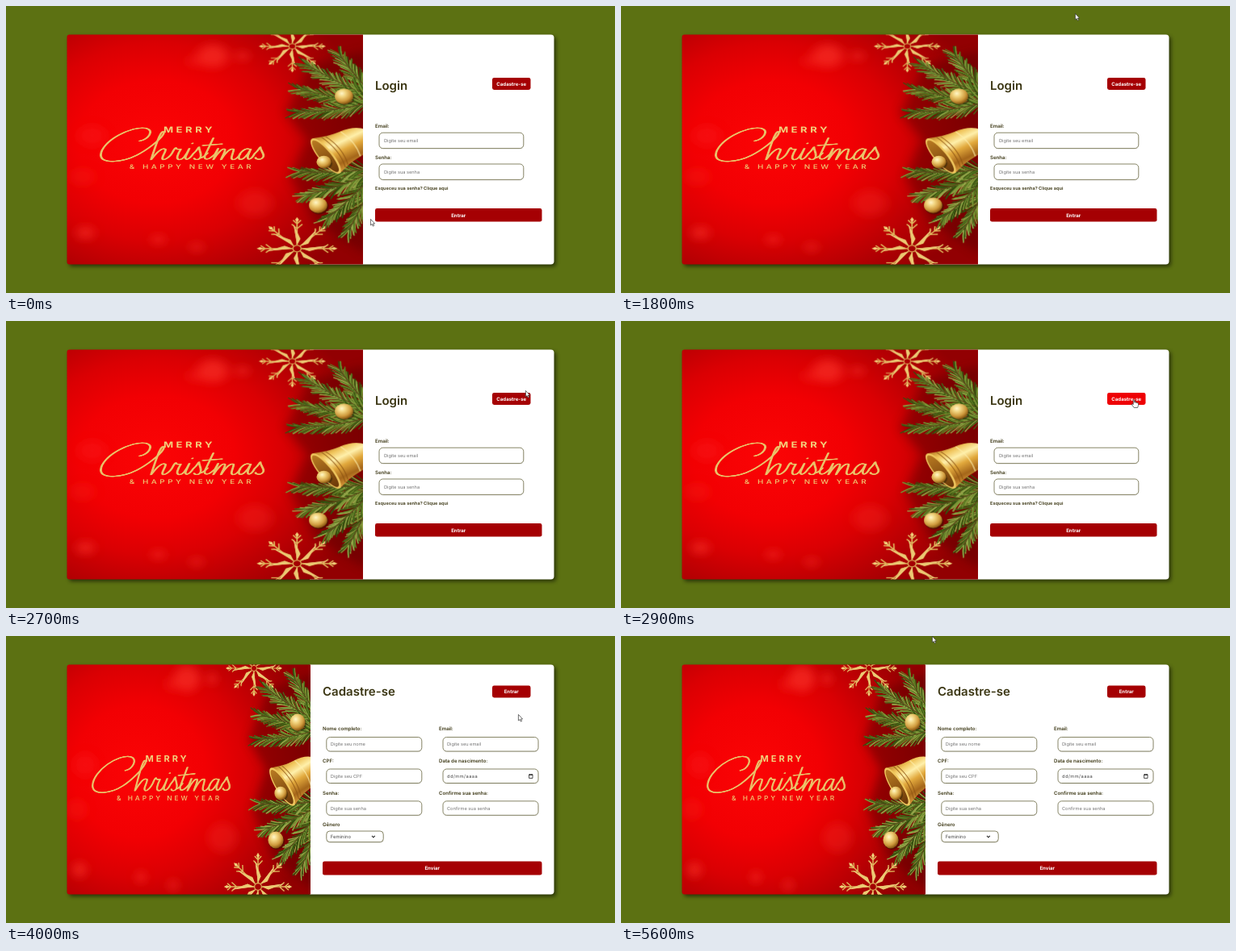
Recreate the animation shown at these times as an HTML page. Size 754 by 356 pixels, loop 5800 ms.

```html
<!DOCTYPE html>
<html lang="pt-BR">
<head>
<meta charset="utf-8">
<title>Login</title>
<style>
html, body { margin: 0; width: 100%; height: 100%; overflow: hidden; background: #5c7112; }
svg { display: block; width: 754px; height: 356px; }
text { font-family: Inter, "Open Sans", sans-serif; white-space: pre; text-rendering: geometricPrecision; }
</style>
</head>
<body>
<svg id="stage" viewBox="0 0 754 356"></svg>
<script>
const LOOP = 5800;
const INK = '#3b3613', RED = '#a50003', HOVER = '#ee0004';

// seeded random, so the art is the same on every load
let seed = 11;
const rnd = () => (seed = (seed * 16807) % 2147483647) / 2147483647;
const between = (a, b) => a + (b - a) * rnd();

const rect = (x, y, w, h, r, fill, more = '') =>
  `<rect x="${x}" y="${y}" width="${w}" height="${h}" rx="${r}" fill="${fill}" ${more}/>`;
const text = (x, y, str, size, weight, fill, more = '') =>
  `<text x="${x}" y="${y}" font-size="${size}" font-weight="${weight}" fill="${fill}" ${more}>${str}</text>`;

const title = (x, y, str) => text(x, y, str, 15, 600, INK);
const label = (x, mid, str, size = 6.1) => text(x, mid + 2.2, str, size, 600, INK);
const button = (x, y, w, h, str, id = '') =>
  rect(x, y, w, h, 2.4, RED, id && `id="${id}"`) +
  text(x + w / 2, y + h / 2 + 2.2, str, 6.1, 700, '#fff', 'text-anchor="middle"');
const box = (x, y, w, h, r) =>
  rect(x + .3, y + 1, w, h, r, '#000', 'opacity=".1"') +
  rect(x, y, w, h, r, '#fff', 'stroke="#69663f" stroke-width=".8"');
const field = (x, y, w, h, hint, pad = 5) =>
  box(x, y, w, h, 4.6) + text(x + pad, y + h / 2 + 2, hint, 5.65, 400, '#777');

// a pine twig: curved stem with needles fanning out towards the tip
function twig(tx, ty, bx, by) {
  const greens = ['#34500f', '#46651a', '#5d7d22', '#7d9838', '#97a94c'];
  const dx = tx - bx, dy = ty - by, dir = Math.atan2(dy, dx);
  const count = 84;
  let out = '';
  for (let i = 0; i <= count; i++) {
    const k = i / count, side = i % 2 ? 1 : -1;
    const x = bx + dx * k, y = by + dy * k + 4 * Math.sin(k * Math.PI);
    const a = dir + side * between(.4, .75) * (1.1 - k * .5);
    const len = between(17, 23) * (1 - k * .25);
    const at = (angle, d) => `${(Math.cos(angle) * d).toFixed(1)} ${(Math.sin(angle) * d).toFixed(1)}`;
    out += `<path d="M${x.toFixed(1)} ${y.toFixed(1)}q${at(a - side * .15, len / 2)} ${at(a, len)}" stroke="${greens[Math.floor(rnd() * 5)]}"/>`;
  }
  return `<g fill="none" stroke-width="1.3" stroke-linecap="round">${out}
    <path d="M${bx} ${by}Q${(bx + tx) / 2} ${(by + ty) / 2 + 5} ${tx} ${ty}" stroke="#5d4a1b" stroke-width="1.3"/></g>`;
}

function flake(x, y, r) {
  const arm = `<path d="M0-4V-33M0-22l-4.6-5M0-22l4.6-5M0-27.5l-3.4-4M0-27.5l3.4-4"/>
    <path d="M0-4l3-7L0-19l-3-8z" fill="url(#gold)" stroke="none"/>
    <path d="M0-4l2.8 -6.5L0-18l-2.8-7.5z" fill="#ecc973" stroke="none"/>
    <path d="M0-35l1.7 3L0-29l-1.7-3z" fill="#f0cf79" stroke="none"/>`;
  let out = '';
  for (let i = 0; i < 8; i++) out += `<g transform="rotate(${i * 45})">${arm}</g>`;
  return `<g transform="translate(${x} ${y}) scale(${r / 34})" fill="none" stroke="#dfb55c" stroke-width="1.2">${out}
    <circle r="3.6" stroke-width="1"/></g>`;
}

const ball = (x, y, r) =>
  `<circle cx="${x + 1}" cy="${y + 2}" r="${r}" fill="#1c1a06" opacity=".4"/>
   <ellipse cx="${x}" cy="${y}" rx="${r * .96}" ry="${r * 1.04}" fill="url(#ball)"/>`;

const bell = `<g transform="translate(342 187) rotate(-32) scale(1.05)">
  <path d="M0-26C8-24 13-20 27-19C46-18 53-9 53 0C53 9 46 18 27 19C13 20 8 24 0 26Z" fill="url(#bell)"/>
  <path d="M9-22.5Q16 0 9 22.5M13-21Q20 0 13 21" fill="none" stroke="#8c5312" stroke-width="1" opacity=".75"/>
  <path d="M29-18.5Q35 0 29 18.5" fill="none" stroke="#fff0ae" stroke-width="1.4" opacity=".6"/>
  <ellipse rx="7.5" ry="26" fill="#f0c75e"/>
  <ellipse cx="-.4" rx="5.8" ry="23.5" fill="url(#mouth)"/></g>` + ball(340, 195, 8);

const script = `<path id="script" d="M147 167C156 165 163 153 154 150C139 146 107 167 106.500 186C107 199 130 195 144 186C152 181 157 176 161 172
  C167 166 174 157 172 154.500C169 152 163 176 159 192C164 184 170 175 174 178C175 181 168 191 172 192C175 192 179 187 181 183
  C183 178 184 176 185 176C185 179 189 178 190 178C187 184 184 192 189 192C192 192 196 185 199 177L195 188C194 194 199 192 203 184
  C206 181 208 177 209 175C209 180 213 186 210 190C208 193 204 192 204 190M210 190C214 189 216 186 218 183
  M224 163L215 187C214 194 220 192 226 184L229 177L224 192C229 182 234 176 236 178C237 181 233 187 232 192C237 182 242 176 245 178C246 181 240 192 245 192C248 192 250 188 252 185
  M262 178C256 175 249 186 251 191C254 194 260 186 263 178L260 187C259 194 264 192 267 184C270 181 272 177 273 175C273 180 279 186 275 190C272 193 268 191 268 189
  M213 173L233 171M202 170.500l.3-.6"/>`;

const glow = (x, y, r, o) => `<circle cx="${x}" cy="${y}" r="${r}" fill="#ff3a30" opacity="${o}"/>`;

const art = rect(70, 20, 316, 316, 0, 'url(#red)') +
  `<g filter="url(#soft)">${glow(224, 53, 16, .55) + glow(255, 53, 6, .6) + glow(205, 60, 8, .3) +
    glow(98, 160, 15, .22) + glow(88, 215, 13, .18) + glow(91, 290, 9, .55) + glow(167, 299, 6, .6) +
    glow(207, 309, 6, .55) + glow(268, 250, 18, .25)}
    <path d="M386 45L325 65L300 130L322 165L305 215L330 275L386 320Z" fill="#5a0000" opacity=".5"/></g>` +
  flake(307, 40, 34) + flake(312, 311, 41) +
  twig(357, 52, 392, 106) + twig(324, 66, 388, 106) + twig(316, 98, 388, 112) + twig(315, 128, 388, 116) +
  twig(366, 286, 392, 218) + twig(344, 270, 390, 214) + twig(322, 239, 388, 210) + twig(315, 208, 388, 204) +
  ball(361, 107, 10) + ball(334, 253, 10) + bell +
  text(172.5, 155.6, 'MERRY', 11, 700, '#f2d27d', 'letter-spacing="3"') +
  `<g fill="none" stroke="#eac36a" stroke-width="1.1" stroke-linecap="round" stroke-linejoin="round">${script}
    <use href="#script" x=".7" y="-.1"/><use href="#script" x="1.3" y="-.2"/></g>` +
  text(137, 204, '&amp; HAPPY NEW YEAR', 8.3, 500, '#f0cb75', 'letter-spacing="3"');

const login = `<g clip-path="url(#wide)"><use href="#art" transform="matrix(1.186 0 0 .926 -9.7 12.9)"/></g>` +
  title(457, 103.6, 'Login') +
  button(602, 89, 47.5, 15, 'Cadastre-se', 'join') +
  label(457, 149, 'Email:') + field(462, 157.2, 178.8, 19.4, 'Digite seu email', 6) +
  label(457, 187.7, 'Senha:') + field(462, 196, 178.8, 19.4, 'Digite sua senha', 6) +
  label(457, 226, 'Esqueceu sua senha? Clique aqui', 5.6) +
  button(457, 251, 206.5, 16.6, 'Entrar');

const L = 396.8, R = 541, W = 118, H = 17.5;
const signup = `<g clip-path="url(#narrow)"><use href="#art"/></g>` +
  title(392, 74.2, 'Cadastre-se') +
  button(602, 61.5, 47.5, 15, 'Entrar') +
  label(392, 115, 'Nome completo:') + field(L, 125.5, W, H, 'Digite seu nome') +
  label(536, 115, 'Email:') + field(R, 125.5, W, H, 'Digite seu email') +
  label(392, 154.3, 'CPF:') + field(L, 165, W, H, 'Digite seu CPF') +
  label(536, 154.3, 'Data de nascimento:') + box(R, 165, W, H, 4.6) +
  text(R + 5, 175.8, 'dd/mm/aaaa', 5.65, 400, '#444', 'letter-spacing=".45"') +
  `<path d="M647.6 171.8h4.4v4.6h-4.4zM647.6 172.4h4.4M648.6 171v1M651 171v1" fill="none" stroke="#222" stroke-width=".8"/>` +
  label(392, 194.3, 'Senha:') + field(L, 204.8, W, H, 'Digite sua senha') +
  label(536, 194.3, 'Confirme sua senha:') + field(R, 204.8, W, H, 'Confirme sua senha') +
  label(392, 233.3, 'Gênero') + box(L, 242, 70.4, 13.6, 4) +
  text(L + 5, 251, 'Feminino', 5.9, 400, '#444') +
  `<path d="M453 247.9l1.9 1.9 1.9-1.9" fill="none" stroke="#222" stroke-width="1.1"/>` +
  button(392, 279.6, 271.5, 17, 'Enviar');

const stops = list => list.map(([o, c]) => `<stop offset="${o}" stop-color="${c}"/>`).join('');
const clip = (id, w) =>
  `<clipPath id="${id}"><path d="M${75.5 + w} 35.5V320.5H78.500a3 3 0 0 1-3-3V38.500a3 3 0 0 1 3-3z"/></clipPath>`;

document.getElementById('stage').innerHTML = `<defs>
  <radialGradient id="red" gradientUnits="userSpaceOnUse" cx="165" cy="168" r="228">${
    stops([[0, '#fb0405'], [.36, '#f20003'], [.58, '#da0003'], [.8, '#b40003'], [1, '#920002']])}</radialGradient>
  <radialGradient id="ball" cx=".38" cy=".32" r=".7">${
    stops([[0, '#fff6c8'], [.3, '#f2d580'], [.7, '#cf9a3d'], [1, '#84520f']])}</radialGradient>
  <linearGradient id="bell" x1="0" y1="0" x2="0" y2="1">${
    stops([[0, '#b87a22'], [.18, '#f0c45a'], [.36, '#fff0ab'], [.55, '#e2a93d'], [.8, '#a5661a'], [1, '#d79a39']])}</linearGradient>
  <linearGradient id="mouth" x1="0" y1="0" x2="0" y2="1">${stops([[0, '#b97a22'], [1, '#6a3808']])}</linearGradient>
  <linearGradient id="gold" x1="0" y1="0" x2="1" y2="1">${stops([[0, '#f8e09a'], [1, '#c9923d']])}</linearGradient>
  <filter id="soft" x="-20%" y="-20%" width="140%" height="140%"><feGaussianBlur stdDeviation="6"/></filter>
  <filter id="shade" x="-5%" y="-5%" width="110%" height="115%"><feGaussianBlur stdDeviation="2.4"/></filter>
  ${clip('wide', 366.5)}${clip('narrow', 301.5)}
  <g id="art">${art}</g></defs>
  ${rect(0, 0, 754, 356, 0, '#5c7112')}
  ${rect(78, 38, 603, 285, 4, '#000', 'opacity=".55" filter="url(#shade)"')}
  <path d="M376 35.500H674.500a4 4 0 0 1 4 4V316.500a4 4 0 0 1-4 4H376z" fill="#fff"/>
  <g id="login">${login}</g><g id="signup">${signup}</g>
  <g id="cursor" stroke-linejoin="round">
    <path id="arrow" d="M.4.4V8L2.1 6.5 3.3 9.1 4.6 8.5 3.4 6H5.6Z" fill="#fff" stroke="#333" stroke-width=".7"/>
    <path id="hand" d="M.2 1Q1-.2 1.8 1V4.2Q3-.0 3.4 4.4Q4.6 3.4 5 4.8Q6.4 4 6.5 5.4V7.6L5.6 10.5H1.2L-1.6 6.8Q-1.6 5.4-.4 6L.2 6.6Z" fill="#fff" stroke="#333" stroke-width=".7"/>
  </g>`;

// pointer stops: time, x, y
const stopsAt = [
  [0, 451, 264], [1400, 526, 17], [1800, 562, 9], [1900, 612, 2], [2000, 660, 7], [2100, 687, 22],
  [2200, 688, 26], [2300, 687, 29], [2400, 683, 37], [2500, 668, 56], [2600, 653, 73], [2700, 643, 86],
  [2800, 637, 93], [2900, 634, 97], [5400, 572, 70], [5500, 448, 20], [5600, 385, 0]
];
const $ = id => document.getElementById(id);
const show = (id, on) => $(id).setAttribute('display', on ? 'inline' : 'none');

function draw(t) {
  const second = t >= 4000, hand = t >= 2900 && !second;
  show('login', !second);
  show('signup', second);
  show('hand', hand);
  show('arrow', !hand);
  $('join').setAttribute('fill', t < 2800 ? RED : t < 2900 ? '#c60004' : HOVER);
  const [, x, y] = stopsAt.filter(s => s[0] <= t).pop();
  $('cursor').setAttribute('transform', `translate(${x} ${y})`);
}

const start = performance.now();
function tick() {
  draw((performance.now() - start) % LOOP);
  requestAnimationFrame(tick);
}
tick();
</script>
</body>
</html>
```
